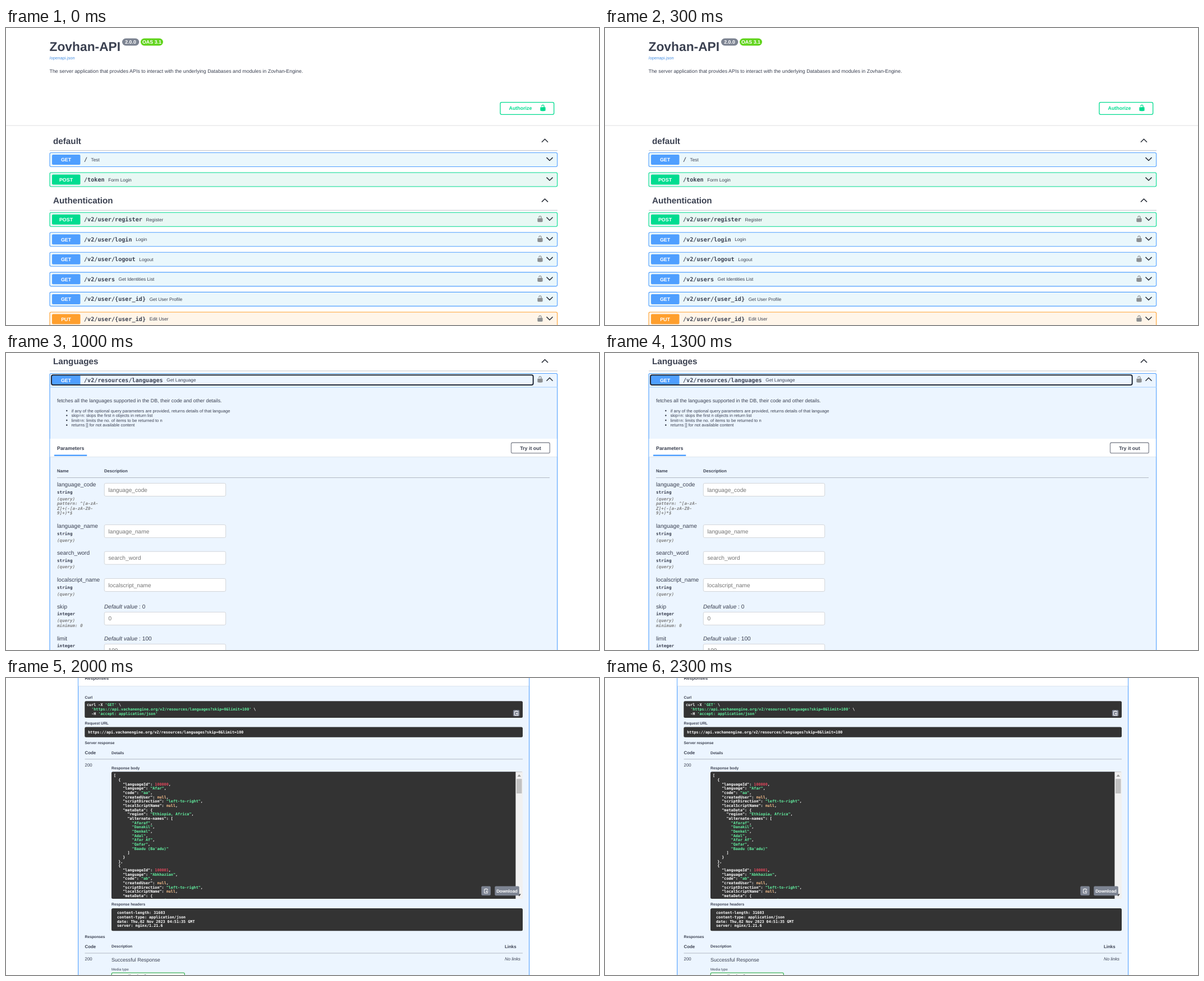
Write an HTML page that moves like this. It is 1057 px wide and 530 px high and loops after 2.5 s.

```html
<!DOCTYPE html>
<html lang="en">
<head>
<meta charset="utf-8">
<title>API documentation</title>
<style>
  html, body { margin: 0; width: 100%; height: 100%; overflow: hidden; background: #fff; }
  svg { display: block; }
  text { font-family: "Liberation Sans", Arial, sans-serif; fill: #3b4151; white-space: pre; text-rendering: geometricPrecision; }
  .b { font-weight: 700; }
  .i { font-style: italic; }
  .m { font-family: "DejaVu Sans Mono", monospace; font-weight: 700; }
</style>
</head>
<body>
<svg id="stage" width="1057" height="530" viewBox="0 0 1057 530"></svg>
<script>
const INK = '#3b4151', BLUE = '#4f9fff', GREEN = '#00dc90', GREY = '#7d8492', DARK = '#333';
const STRING = '#62f0a0', NUMBER = '#e2485c', NULL = '#fcc28c';
const METHODS = {
  GET: [BLUE, '#eaf7fc'],
  POST: [GREEN, '#e8f8f4'],
  PUT: ['#ff9f2d', '#fff5e9'],
  DELETE: ['#ff0036', '#ffe3e9'],
};

const esc = s => s.replace(/&/g, '&amp;').replace(/</g, '&lt;');
const raw = (x, y, markup, size, cls = '', fill = INK, anchor = 'start') =>
  `<text x="${x}" y="${y}" font-size="${size}" class="${cls}" style="fill:${fill}" text-anchor="${anchor}">${markup}</text>`;
const text = (x, y, s, ...style) => raw(x, y, esc(s), ...style);
const span = (s, fill) => `<tspan style="fill:${fill}">${esc(s)}</tspan>`;
const box = (x1, y1, x2, y2, fill, stroke = 'none', r = 2.5, w = 1) =>
  `<rect x="${x1}" y="${y1}" width="${x2 - x1}" height="${y2 - y1}" rx="${r}" fill="${fill}" stroke="${stroke}" stroke-width="${w}"/>`;
const rule = (x1, x2, y, color, w = 1) =>
  `<path d="M${x1} ${y}H${x2}" stroke="${color}" stroke-width="${w}"/>`;
const chevron = (x, y, dir) =>
  `<path d="M${x - 5.5} ${y - 2.7 * dir}l5.5 ${5.4 * dir}l5.5 ${-5.4 * dir}" fill="none" stroke="#252a35" stroke-width="1.5"/>`;
const lock = (x, y, fill = '#8d9092') =>
  `<path transform="translate(${x - 6.6} ${y - 6.3}) scale(.66 .63)" fill="${fill}" d="M17 9.2V17q0 1-1 1.3-1.5.7-3.1.7H7.1Q5.5 19 4 18.3 3 18 3 17V9.2Q3 8 4 8h8V5.2Q12 3 10 3T8 5.2V6H6V5.6Q6 1 10 1t4 4.6V8h2q1 0 1 1.2z"/>`;

// Method badge, path and summary of one operation
function opText(method, path, summary, y) {
  return box(82, y - 9, 132.5, y + 9, METHODS[method][0], 'none', 2) +
    text(107, y + 3.3, method, 8.89, 'b', '#fff', 'middle') +
    text(139, y + 3.3, path, 10.16, 'm') +
    text(145.5 + path.length * 6.12, y + 3, summary, 8.26);
}

function row(y, method, path, summary, locked = true) {
  const [color, bg] = METHODS[method];
  return box(78, y - 12.5, 982.7, y + 12.5, bg, color, 2.5, 1.1) + opText(method, path, summary, y) +
    (locked ? lock(952, y - 1) : '') + chevron(969, y - 1.2, 1);
}

// Heading placed above an operation whose centre is y
const tag = (y, name) => text(84, y - 28.4, name, 15.24, 'b') +
  rule(78, 983, y - 16.4, '#bfc1c8') + chevron(960.5, y - 34, -1);

const section = (y, name, path, ops, locked) => tag(y, name) +
  ops.map(([method, summary, sub = ''], i) => row(y + i * 35.55, method, path + sub, summary, locked)).join('');

function overview() {
  return text(77.5, 40.5, 'Zovhan-API', 22.8, 'b') +
    box(207, 18.5, 237.3, 31.5, GREY, 'none', 6.5) + text(222.1, 28.4, '2.0.0', 8.89, 'b', '#fff', 'middle') +
    box(240, 18.5, 280, 31.5, '#62d41e', 'none', 6.5) + text(260, 28.4, 'OAS 3.1', 8.89, 'b', '#fff', 'middle') +
    text(77.5, 56, '/openapi.json', 7.62, '', '#4990e2') +
    text(77.5, 79.6, 'The server application that provides APIs to interact with the underlying Databases and modules in Zovhan-Engine.', 8.89) +
    box(881, 132.7, 976.7, 154.3, '#fff', GREEN, 2.5, 1.3) +
    text(896.5, 146.2, 'Authorize', 8.89, 'b', GREEN) + lock(957, 142.5, GREEN) +
    rule(0, 1057, 174, '#dfdfe1', 1.2) +
    section(235, 'default', '/', [['GET', 'Test'], ['POST', 'Form Login', 'token']], false) +
    section(341.7, 'Authentication', '/v2/user', [
      ['POST', 'Register', '/register'], ['GET', 'Login', '/login'], ['GET', 'Logout', '/logout'],
      ['GET', 'Get Identities List', 's'], ['GET', 'Get User Profile', '/{user_id}'], ['PUT', 'Edit User', '/{user_id}']]);
}

function resources() {
  const base = '/v2/resources/';
  return row(-3.5, 'PUT', '/v2/user/{user_id}', 'Edit User') +
    row(32, 'PUT', '/v2/user/role', 'Userrole') +
    row(67.6, 'DELETE', '/v2/user', 'Delete User') +
    section(139, 'Resources Types', base + 'types',
      [['GET', 'Get Resources Types'], ['POST', 'Add Resources Types'], ['DELETE', 'Delete Resources Types']]) +
    section(281.6, 'Languages', base + 'languages',
      [['GET', 'Get Language'], ['POST', 'Add Language'], ['PUT', 'Edit Language'], ['DELETE', 'Delete Languages']]) +
    section(459.4, 'Licenses', base + 'licenses',
      [['GET', 'Get License'], ['POST', 'Add License'], ['PUT', 'Edit License']]);
}

function param(y, name, type, notes, editing, preset) {
  const showDefault = preset && !editing;
  const inputY = y + (showDefault ? 21.3 : 9);
  return text(91, y + 3.4, name, 10.16) + text(91, y + 15.8, type, 7.62, 'm') +
    ['(query)', ...notes].map((s, i) => text(91, y + 27.6 + i * 8.55, s, 7.62, 'm i', '#808080')).join('') +
    (showDefault ? raw(175, y + 3.4, `<tspan class="i">Default value</tspan> : ${preset}`, 10.16) : '') +
    box(175.3, inputY - 11.5, 391.7, inputY + 11.5, '#fff', '#d3d6da') +
    text(182.5, inputY + 3.5, preset || name, 10.16, '', preset && editing ? '#222' : '#757575');
}

function details(editing) {
  const bullets = [
    'if any of the optional query parameters are provided, returns details of that language',
    'skip=n: skips the first n objects in return list',
    'limit=n: limits the no. of items to be returned to n',
    'returns [] for not available content'];
  const params = [
    [235, 'language_code', 'string', ['pattern: ^[a-zA-', 'Z]+(-[a-zA-Z0-', '9]+)*$']],
    [309, 'language_name', 'string', []],
    [356.7, 'search_word', 'string', []],
    [405, 'localscript_name', 'string', []],
    [452.6, 'skip', 'integer', ['minimum: 0'], '0'],
    [editing ? 508.4 : 509.6, 'limit', 'integer', ['minimum: 0'], '100']];
  const [x1, x2, label, color, edge] = editing
    ? [908.3, 969.3, 'Cancel', '#ff1f50', '#ff1f50'] : [900.5, 969.3, 'Try it out', INK, '#858994'];
  return tag(48.4, 'Languages') +
    box(78, 36.5, 982.7, 650, editing ? '#ecf8ff' : '#ecf5ff', BLUE, 2.5, 1.1) +
    rule(78, 983, 61, '#9fcdfc') +
    opText('GET', '/v2/resources/languages', 'Get Language', 48.2) +
    (editing ? '' : box(81, 39.2, 939.7, 57, 'none', '#232a38', 3, 2)) +
    lock(952, 47) + chevron(969, 47, -1) +
    text(91, 88.2, 'fetches all the languages supported in the DB, their code and other details.', 8.89) +
    bullets.map((s, i) => `<circle cx="108.3" cy="${103 + i * 8.55}" r="1.3" fill="${INK}"/>` +
      text(116.5, 105.5 + i * 8.55, s, 7.62)).join('') +
    box(78.6, 153, 982.1, 185, '#fff', 'none', 0) + rule(78.6, 982.1, 185.4, '#dde5ee') +
    text(91, 172.7, 'Parameters', 8.89, 'b') + rule(86, 144.3, 182.8, BLUE, 2.5) +
    box(x1, 160, x2, 178.7, '#fff', edge, 2.5, 1.3) +
    text((x1 + x2) / 2, 172.5, label, 8.89, 'b', color, 'middle') +
    text(91, 212.8, 'Name', 7.62, 'b') + text(175, 212.8, 'Description', 7.62, 'b') +
    rule(91, 969, 222.5, '#b2b9c3') +
    params.map(([y, name, type, notes, preset]) => param(y, name, type, notes, editing, preset)).join('');
}

const form = () => `<g transform="translate(59.2 -14.9) scale(.889)">${details(true)}</g>` +
  box(140, 499, 921, 519, '#3f80e2', 'none', 2) + text(530.5, 511.8, 'Execute', 8, 'b', '#fff', 'middle');

const copyButton = (x, y, r) => box(x - r, y - r, x + r, y + r, GREY, 'none', 2) +
  `<g fill="none" stroke="#fff" stroke-width="1"><path d="M${x + 3} ${y - 1}V${y - 3}H${x - 3}V${y + 4}H${x + 3}V${y + 2.5}M${x + 4} ${y + 1}H${x}l1.5-1.5M${x} ${y + 1}l1.5 1.5M${x - 1.5} ${y - 3.5}h3"/></g>`;

const language = (id, name, code, region) => [
  '  {', `    "languageId": ${id},`, `    "language": "${name}",`, `    "code": "${code}",`,
  '    "createdUser": null,', '    "scriptDirection": "left-to-right",', '    "localScriptName": null,',
  '    "metaData": {', `      "region": "${region}",`];

const colorJson = line => esc(line).replace(/"[^"]*"(:?)|\d+|null/g, (s, colon) =>
  colon ? s : `<tspan style="fill:${s[0] === '"' ? STRING : s === 'null' ? NULL : NUMBER}">${s}</tspan>`);

function response() {
  const url = 'https://api.vachanengine.org/v2/resources/languages?skip=0&limit=100';
  const code = (x, y, markup) => raw(x, y, markup, 6.78, 'm', '#fff');
  const label = (x, y, s, size = 6.78) => text(x, y, s, size, 'b');
  const json = ['[', ...language(100000, 'Afar', 'aa', 'Ethiopia, Africa'),
    '      "alternate-names": [',
    ...['Afaraf', 'Danakil', 'Denkel', 'Adal', 'Afar Af', 'Qafar', "Baadu (Ba'adu)"]
      .map((s, i) => `        "${s}"${i < 6 ? ',' : ''}`),
    '      ]', '    }', '  },', ...language(100001, 'Abkhazian', 'ab', 'Georgia, Asia')];
  const headers = ['content-length: 31603', 'content-type: application/json',
    'date: Thu,02 Nov 2023 04:51:35 GMT', 'server: nginx/1.21.6'];
  return box(128.7, -10, 932.6, 540, '#ecf5ff', BLUE, 0, 1.1) +
    box(129.2, -5, 932.1, 14, '#fff', 'none', 0) + rule(129.2, 932.1, 14.5, '#dde5ee') +
    label(140.5, 2.8, 'Responses', 8) +

    label(140.5, 37.2, 'Curl') + box(140.3, 41.2, 921, 71, DARK) +
    code(144, 50.3, 'curl -X ' + span("'GET'", STRING) + ' \\') +
    code(144, 58.1, '  ' + span(`'${url}'`, STRING) + ' \\') +
    code(144, 65.8, '  -H ' + span("'accept: application/json'", STRING)) + copyButton(909.6, 62.6, 5.7) +

    label(140.5, 83.2, 'Request URL') + box(140.3, 87.5, 921, 105.8, DARK) + code(146.3, 99, esc(url)) +
    label(140.5, 118, 'Server response') +
    label(140.5, 136, 'Code', 7.9) + label(188, 136, 'Details') + rule(140.5, 921, 144.8, '#b2b9c3') +
    text(140.5, 158.2, '200', 7.9) +

    label(188, 163.2, 'Response body') + box(188, 167.3, 921, 394, DARK) +
    `<g clip-path="url(#body)">${json.map((s, i) => code(192, 176.4 + i * 7.66, colorJson(s))).join('')}</g>` +
    box(908.4, 167.3, 921, 394, '#f1f1f1', 'none', 0) + box(910, 180, 919.5, 206, '#c1c1c1', 'none', 0) +
    '<path d="M911.5 176l3.2-4 3.2 4z" fill="#9a9a9a"/><path d="M911.5 385.5h6.4l-3.2 4z" fill="#444"/>' +
    copyButton(855.6, 379.8, 8.3) + box(871.3, 371.5, 914.8, 388.2, GREY, 'none', 2) +
    text(893, 382.8, 'Download', 7.9, 'b', '#fff', 'middle') +

    label(188, 405.6, 'Response headers') + box(188, 411, 921, 451.3, DARK) +
    headers.map((s, i) => code(198, 421.4 + i * 7.66, s)).join('') +

    label(140.5, 464, 'Responses') +
    label(140.5, 481.6, 'Code', 7.9) + label(188, 481.2, 'Description') + label(889, 481.6, 'Links', 7.9) +
    rule(140.5, 921, 491, '#b2b9c3') +
    text(140.5, 504.4, '200', 7.9) + text(188, 505.6, 'Successful Response', 9.04) +
    text(889, 504.2, 'No links', 7.9, 'i') + text(188, 522, 'Media type', 6.3) +
    box(188.3, 526.2, 318.3, 545, '#f8fcf9', '#41b45a', 2, 1.3) + text(204, 535, 'application/json', 7.9, 'b');
}

const stage = document.getElementById('stage');
const scenes = [overview(), resources(), details(false), form(), response()];
stage.innerHTML = '<clipPath id="body"><path d="M188 167H908V394H188z"/></clipPath>' +
  scenes.map(s => `<g class="scene">${s}</g>`).join('');
const groups = [...stage.querySelectorAll('.scene')];

const start = performance.now();
function draw(now) {
  const current = Math.floor(Math.max(0, now - start) % 2500 / 500);
  groups.forEach((g, i) => g.style.display = i === current ? '' : 'none');
  requestAnimationFrame(draw);
}
draw(start);
</script>
</body>
</html>
```
